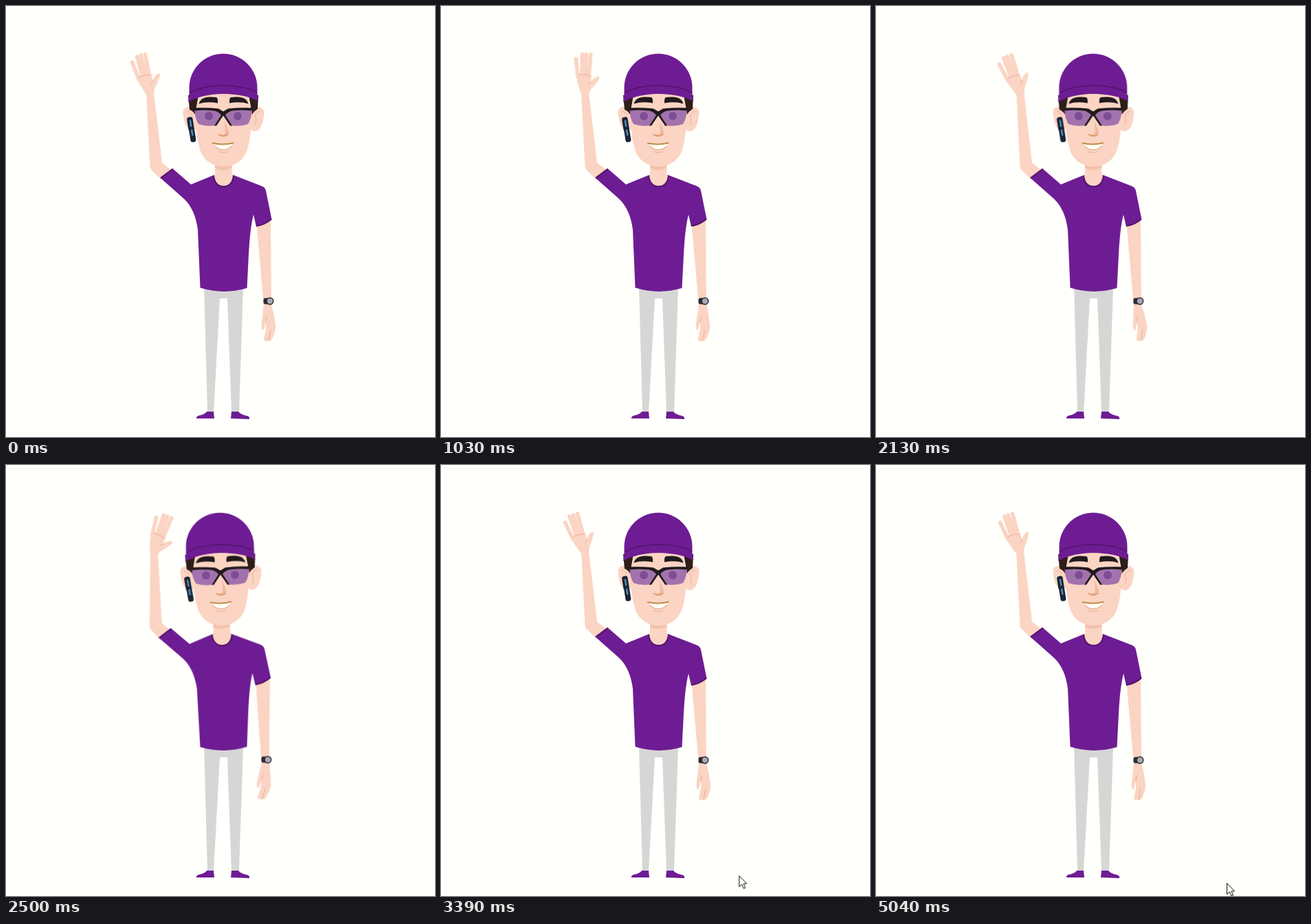
Write an HTML page without scripts that moves like this. It is 624x628 px and loops after 5070 ms.

```html
<!DOCTYPE html>
<html lang="en">
<head>
<meta charset="utf-8">
<title>Waving man</title>
<style>
  html, body { margin: 0; width: 100%; height: 100%; overflow: hidden; background: #fffffc; }
  svg { display: block; width: 624px; height: 628px; }

  .skin { fill: #fbd4c3; }
  .shade { fill: #f0b8a0; }
  .crease { fill: none; stroke: #e9ae9a; stroke-width: 1; stroke-linecap: round; }
  .cloth { fill: #6e1c93; }
  .hem { fill: none; stroke: #501566; stroke-width: 2; }
  .pants { fill: #d6d6d6; }
  .dark { fill: #211a1c; }
  .hair { fill: #2f1e18; }
  .lens { fill: #8e5aa8; fill-opacity: .8; }
  .finger { fill: none; stroke: #fbd4c3; stroke-width: 5.6; stroke-linecap: round; }

  .body, .head, .forearm, .wave, .arm, .hand {
    animation: 5070ms cubic-bezier(.37, 0, .63, 1) infinite;
  }
  .body { transform-origin: 317px 412px; animation-name: sway; }
  .head { transform-origin: 316px 250px; animation-name: tilt; }
  .forearm { transform-origin: 221px 240px; animation-name: lean; }
  .wave { transform-origin: 209px 126px; animation-name: wave; }
  .arm { transform-origin: 374px 318px; animation-name: swing; }
  .hand { transform-origin: 381px 436px; animation-name: wag; }
  .cursor { animation: cursor 5070ms linear infinite; }

  /* three sways, then a rest */
  @keyframes sway {
    0%, 20.32%, 40.63%, 60.95%, 100% { transform: rotate(0deg); }
    10.16%, 30.47%, 50.79% { transform: rotate(-.85deg); }
  }
  @keyframes tilt {
    0%, 20.32%, 40.63%, 60.95%, 100% { transform: rotate(0deg); }
    10.16%, 30.47%, 50.79% { transform: rotate(-.3deg); }
  }
  @keyframes lean {
    0%, 20.32%, 40.63%, 60.95%, 100% { transform: none; }
    10.16%, 30.47%, 50.79% { transform: translate(1.5px, 0) rotate(4.5deg); }
  }
  @keyframes swing {
    0%, 20.32%, 40.63%, 60.95%, 100% { transform: rotate(0deg); }
    10.16%, 30.47%, 50.79% { transform: rotate(1.8deg); }
  }
  @keyframes wave {
    0% { transform: rotate(4deg); }
    9.96%, 23.18%, 36.39%, 49.61% { transform: rotate(35deg); }
    16.57%, 29.78%, 43%, 56.21% { transform: rotate(-4deg); }
    60.95%, 100% { transform: rotate(0deg); }
  }
  @keyframes wag {
    0%, 60.95%, 100% { transform: rotate(0deg); }
    9.96%, 23.18%, 36.39%, 49.61% { transform: rotate(6deg); }
    16.57%, 29.78%, 43%, 56.21% { transform: rotate(-5deg); }
  }
  @keyframes cursor {
    0%, 64.4% { transform: translate(589px, 593px); visibility: hidden; }
    64.5%, 64.9% { transform: translate(589px, 593px); visibility: visible; }
    66.86% { transform: translate(433px, 598px); }
    75.74% { transform: translate(508px, 609px); }
    82% { transform: translate(517px, 609px); }
    87.2% { transform: translate(513px, 609px); }
    92%, 100% { transform: translate(510px, 609px); visibility: visible; }
  }
</style>
</head>
<body>
<svg viewBox="0 0 624 628">
  <!-- legs -->
  <path class="pants" d="M288 409H345L339 592H328L322 426H311L302 592H293Z"/>
  <path class="cloth" d="M292 591H302L303 601H277Q276 597 284 596Q290 594 292 591Z"/>
  <path class="cloth" d="M328 591H338Q341 595 350 597Q355 598 354 602L327 601Z"/>

  <g class="body">
    <!-- raised arm -->
    <g class="forearm">
      <path class="skin" d="M204 126L209.500 234Q210 238 213 240L226 253L243 241L227 228.500L215 126Z"/>
      <g class="wave">
        <path class="finger" d="M192 108L180.500 84M197 104L187 75M202 103L192.500 73M207 102L198.500 71"/>
        <path class="skin" d="M189 105Q199 97 210 99L212 108Q216 99 220 97Q223 98 221.500 103Q219 113 216 119L215 128Q209 132 203 128L193 114Z"/>
        <path class="crease" d="M192 105Q200 100 208 101M210 113Q212 109 213 108"/>
      </g>
    </g>

    <!-- lowered arm -->
    <g class="arm">
      <g class="hand">
        <path class="skin" d="M375 434L371.500 466Q372 474 375 472L378 460L378 471L375 486Q377 490 381 488Q386 489 388 483Q393 471 392 465Q390 449 386 434Z"/>
        <path class="crease" d="M378 460L379 453M382 487L385 472"/>
      </g>
      <path class="skin" d="M364 312L375 437Q381 440 386 437L385 308Z"/>
      <rect x="374.500" y="425.500" width="13" height="9" rx="3" fill="#2b2b33"/>
      <circle cx="384" cy="430" r="5.500" fill="#2b2b33"/>
      <circle cx="384" cy="430" r="4" fill="#a9a8b2"/>
    </g>

    <!-- shirt -->
    <path class="cloth" d="M302 246.500L269 260L242 236.500L224 250L259 281Q275 296 279 326L282.500 410.500Q316 421 350.500 411L353 362Q355 323 360 304L364 321.500Q376 320 386.500 311L378 269Q377 264 371 262L331 246.500Z"/>
    <path class="hem" d="M225.500 250.500L243 237.500M364 320.500Q376 319 386 310.500"/>

    <!-- neck -->
    <path class="skin" d="M304 222H328.500V246L330.500 248Q329 262 316.500 262Q304 262 302.500 248L304 246Z"/>
    <path class="hem" d="M302 247Q304 263 316.500 263Q329 263 331 247"/>

    <g class="head">
      <path class="shade" d="M304 230H328.500V235Q316 242 304 236Z" opacity=".7"/>
      <path class="skin" d="M277 152Q269 144 261 148Q256 151 258 160Q260 178 269 181Q275 182 278 178Z"/>
      <path class="skin" d="M355 152Q364 145 371 148Q377 151 375 160Q373 178 365 182Q359 184 355 179Z"/>
      <path class="crease" d="M263 154Q266 152 270 158M370 154Q366 152 362 160Q366 166 362 173"/>
      <path class="hair" d="M265 130H367L366 150Q361 153 358 158L353 130H280L275 158Q272 153 267 151Z"/>
      <path class="skin" d="M279 140L281 122H352L354 141L357 155Q357 188 352 205C348 224 333 234 316.500 234C300 234 285 224 281 205Q275 184 275.500 155Z"/>

      <!-- cap -->
      <path class="cloth" d="M266.500 128V119A49.500 49.500 0 0 1 365.500 119V128L367 139Q349 128.500 316 128Q284 128.500 265 140Z"/>
      <path d="M267 127Q283 116.500 316 116Q349 116.500 365 126" fill="none" stroke="#501566" stroke-width="1.400"/>

      <!-- brows -->
      <path class="dark" d="M280.500 142.500Q283 132.500 297 132.500L306 133Q308.500 134 308 141.500Q292 138.500 280.500 142.500Z"/>
      <path class="dark" d="M352.500 142.500Q350 132.500 336 132.500L327 133Q324.500 134 325 141.500Q341 138.500 352.500 142.500Z"/>

      <!-- glasses -->
      <g id="eye">
        <ellipse cx="294" cy="160.500" rx="9.500" ry="7" fill="#efdce6"/>
        <circle cx="295" cy="160.500" r="6" fill="#3f1a3c"/>
        <path class="lens" d="M274 151L309 152L314 160L305 174Q291 176 280 172Q275 164 274 151Z"/>
        <path class="dark" d="M272.500 148.500Q292 147.500 309 149.500L316.500 154V159L306 174.500H303L313 159Q309 153.500 302 152.500Q287 151 275.500 152.500Q273 151.500 272.500 148.500Z"/>
      </g>
      <use href="#eye" transform="matrix(-1 0 0 1 632 0)"/>

      <!-- nose and mouth -->
      <path class="shade" d="M318 168L324 183Q325 188 319 190Q312 191 308 186Q315 189 319 185Z"/>
      <path d="M309 187Q316 192 323 187" fill="none" stroke="#d9935c" stroke-width="1.400" stroke-linecap="round"/>
      <path d="M302 200.500Q316 203 330 200Q327 209 316 209Q306 209 302 200.500Z" fill="#fffdf8"/>
      <path d="M301 200Q316 203 330.500 199.500" fill="none" stroke="#c08b42" stroke-width="2" stroke-linecap="round"/>
      <path d="M304 204Q308 209.500 316 209.500Q324 209.500 328 204" fill="none" stroke="#e0a577" stroke-width="1.200"/>
      <path class="crease" d="M309 212.500Q316 214.500 323 212.500"/>

      <!-- earpiece -->
      <g transform="rotate(-9 270 180)">
        <rect x="265.500" y="161.500" width="8.500" height="21" rx="3.500" fill="#1c2436"/>
        <rect x="266" y="179" width="8" height="19.500" rx="3.500" fill="#1c2436"/>
        <path d="M270 167V175M270 181V188" stroke="#4a93b8" stroke-width="2.400" stroke-linecap="round"/>
      </g>
    </g>
  </g>

  <path class="cursor" d="M.5.5V16.500L4.500 13L7 19L9.500 18L7 12H11.500Z" fill="#fff" stroke="#111" stroke-width="1"/>
</svg>
</body>
</html>
```
